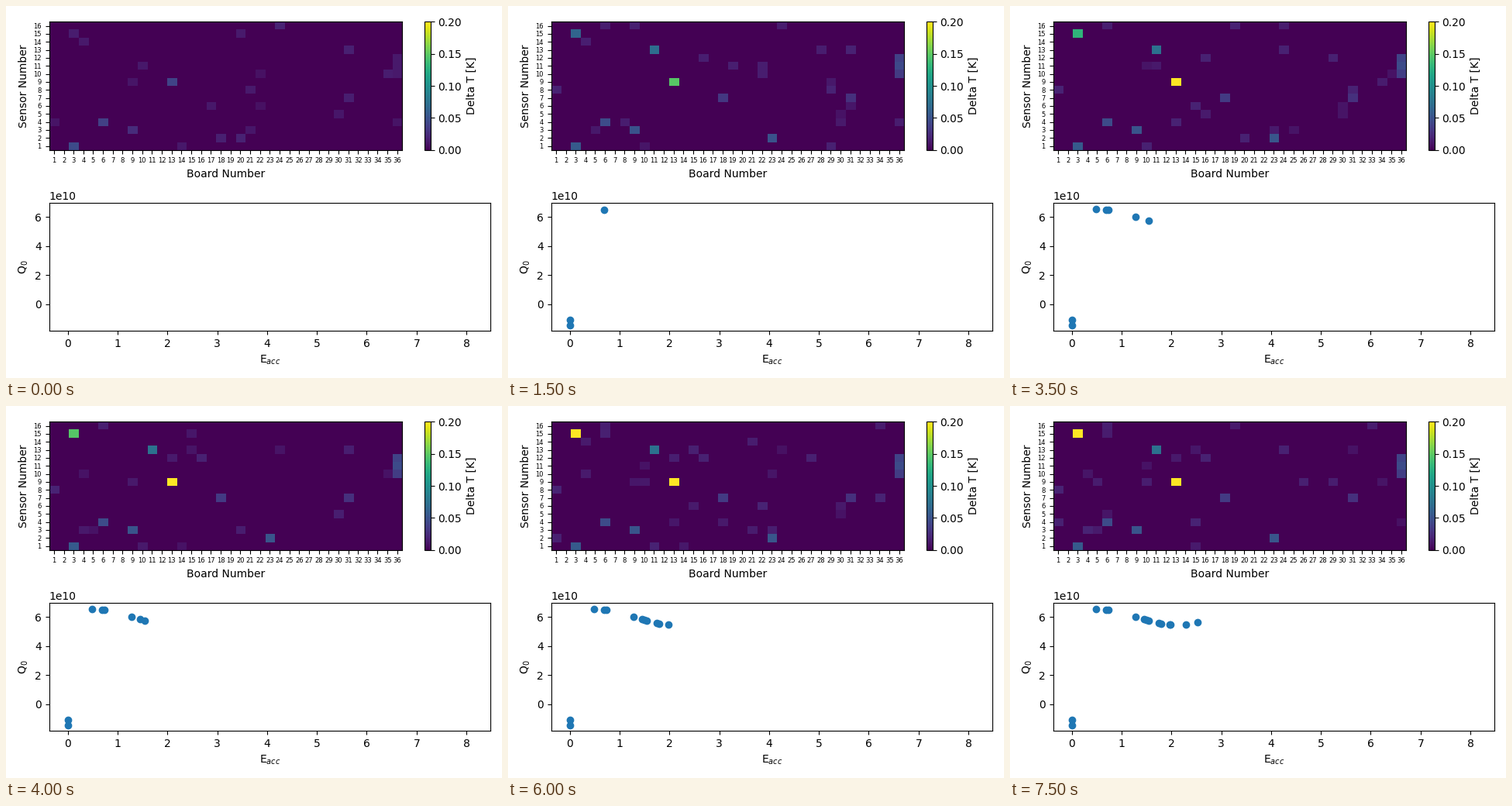
Animation of 640 by 480 pixels, one loop 8 s. Source, as a matplotlib script:

```python
import numpy as np
import matplotlib.pyplot as plt
from matplotlib.animation import FuncAnimation

FRAMES, STEP = 16, 500
BOARDS, SENSORS = 36, 16

# (board, sensor) -> mK at the start and mK gained per step
RISING = {(13, 9): (40, 36), (3, 15): (15, 16.5)}

# (board, sensor) -> mK at the start and mK once settled
SETTLING = {
    (11, 13): (0, 75), (3, 1): (45, 57), (6, 4): (38, 46), (9, 3): (25, 52),
    (23, 2): (0, 53), (36, 12): (14, 40), (36, 11): (14, 46),
    (36, 10): (14, 36), (18, 7): (0, 34), (31, 7): (17, 28),
    (1, 8): (0, 20), (16, 12): (0, 18), (6, 16): (0, 17),
}

# How often each sensor flickers above the noise floor: mostly never
CHANCE = 0.5 * np.random.default_rng(5).random((SENSORS, BOARDS)) ** 12

# Accelerating field per measurement; the first two are taken with no field
E_ACC = np.array([0.01, 0.01, 0.69, 0.49, 0.73, 1.285, 1.553, 1.455,
                  1.505, 1.75, 1.80, 1.985, 1.97, 2.295, 2.53])
Q0 = 6.0 + 0.54 * np.cos(np.pi * (E_ACC - 0.5) / 1.6)
Q0[:2] = -1.47, -1.10


def heat_map(step):
    """Temperature rise in K for every sensor at one step."""
    rng = np.random.default_rng(step)
    lit = rng.random(CHANCE.shape) < CHANCE
    grid = lit * rng.uniform(9, 20, CHANCE.shape)
    for (board, sensor), (start, rate) in RISING.items():
        grid[sensor - 1, board - 1] = start + rate * step
    for (board, sensor), (start, end) in SETTLING.items():
        grid[sensor - 1, board - 1] = end + (start - end) * np.exp(-step)
    return grid / 1000


fig, (heat_ax, q_ax) = plt.subplots(2, 1, figsize=(6.4, 4.8), dpi=100)

image = heat_ax.imshow(
    heat_map(0), cmap="viridis", vmin=0, vmax=0.2, origin="lower",
    aspect="auto", interpolation="nearest",
    extent=(0.5, BOARDS + 0.5, 0.5, SENSORS + 0.5))
heat_ax.set_xticks(range(1, BOARDS + 1))
heat_ax.set_yticks(range(1, SENSORS + 1))
heat_ax.tick_params(labelsize=6)
heat_ax.set_xlabel("Board Number")
heat_ax.set_ylabel("Sensor Number")
fig.colorbar(image, ax=heat_ax, label="Delta T [K]",
             ticks=np.linspace(0, 0.2, 5))

q_ax.set_xlim(-0.374, 8.48)
q_ax.set_ylim(-1.84e10, 6.96e10)
q_ax.set_xlabel("E$_{acc}$")
q_ax.set_ylabel("Q$_0$")
points, = q_ax.plot([], [], "o", color="tab:blue")

fig.tight_layout()


def update(step):
    image.set_data(heat_map(step))
    points.set_data(E_ACC[:step], Q0[:step] * 1e10)
    return image, points


anim = FuncAnimation(fig, update, frames=FRAMES, interval=STEP,
                     repeat=True, repeat_delay=0)
plt.show()
```
